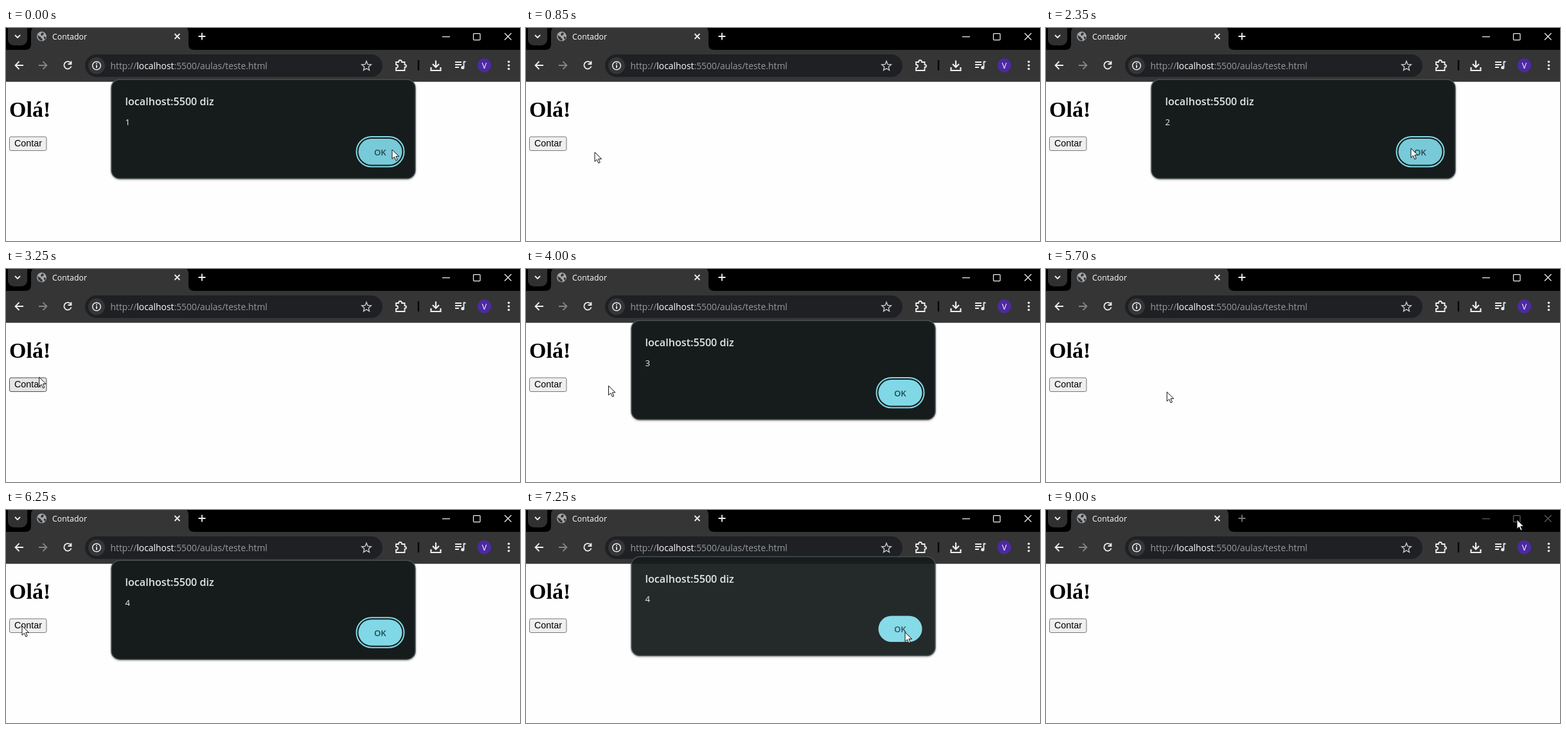
Animation of 800x331 px, one loop 9.05 s. Source, as an HTML page:

```html
<!DOCTYPE html>
<html lang="pt">
<head>
<meta charset="utf-8">
<title>Contador</title>
<style>
  html, body { margin: 0; height: 100%; overflow: hidden; background: #fff; }
  svg { display: block; width: 100%; height: 100%; }
  text { font-family: "Open Sans", "Noto Sans", sans-serif; }
  .line { fill: none; stroke: #eee; stroke-width: 1.8; }
  .thin { stroke-width: 1.25; }
</style>
</head>
<body>
<svg viewBox="0 0 800 331">
  <defs>
    <filter id="shadow" x="-10%" y="-10%" width="120%" height="125%">
      <feDropShadow dx="0" dy="1" stdDeviation="1.5" flood-opacity=".4"/>
    </filter>
  </defs>
  <rect width="800" height="331" fill="#fefefe"/>

  <!-- Title bar and tab -->
  <rect width="800" height="35" fill="#000"/>
  <rect x="3" y="-8" width="30" height="35" rx="9" fill="#303030"/>
  <path class="line" d="M14 11l4 4 4-4"/>
  <path d="M30 34q9 0 9-9V7q0-7 7-9H277q7 2 7 9V25q0 9 9 9z" fill="#353535"/>
  <circle cx="55.5" cy="13" r="7.5" fill="#a4a8ac"/>
  <path d="M49 11l5 3 1 2 2 1-1 3q-6-1-7-9zM56 7l3 1-1 3-3 1-1-2zM59 13l3 1-1 4-2-2z" fill="#353535"/>
  <text x="72" y="18" font-size="12.3" fill="#fff">Contador</text>
  <path class="line" d="M262.500 9l8 8m0-8l-8 8"/>
  <path class="line" id="plus" d="M299.500 13h11m-5.500-5.500v11"/>
  <g class="line thin" id="controls">
    <path d="M679 13.500h12M776 8l10.500 10.500m0-10.500l-10.500 10.500"/>
    <rect x="727.500" y="8.500" width="10.500" height="10" rx="1"/>
  </g>

  <!-- Toolbar -->
  <rect y="34" width="800" height="49.600" fill="#353535"/>
  <path class="line" d="M27 58H14.500m6-6l-6 6 6 6"/>
  <path class="line" d="M51 58h12.500m-6-6l6 6-6 6" style="stroke:#858585"/>
  <path class="line" d="M101 55a5.700 5.700 0 1 0 .5 4.500M101.500 51.500v4.500h-5"/>
  <rect x="123" y="41" width="463" height="35" rx="17.500" fill="#1f2023"/>
  <circle cx="141" cy="58.500" r="13" fill="#353638"/>
  <circle class="line" cx="141" cy="58.500" r="6.300" style="stroke-width:1.5"/>
  <path class="line" d="M141 57.500v4.500m0-7.500v1.700"/>
  <text x="162.500" y="64" font-size="13.9" fill="#989a9d">http://<tspan fill="#fff">localhost</tspan>:5500/aulas/teste.html</text>
  <path class="line" d="M561 51.500l2 5 5.300.4-4 3.500 1.200 5.200-4.500-2.800-4.500 2.800 1.200-5.200-4-3.500 5.300-.4z" style="stroke:#c6c8ca;stroke-width:1.4"/>
  <path class="line" d="M607 53h4q0-3 2.500-3t2.500 3h4.500v4q2.500 0 2.500 2t-2.500 2v5h-13.500v-4q3 0 3-2.500t-3-2.500z"/>
  <path d="M642 50v16" stroke="#080808" stroke-width="2.500"/>
  <path class="line" d="M669 50.500v10m-5-4.500l5 5 5-5M661.500 61v5h15v-5" style="stroke-width:2.200"/>
  <path class="line" d="M699 53h10m-10 4h10m-10 4h6M712.500 61v-8.500h3"/>
  <circle cx="710.800" cy="61.500" r="2.600" fill="#e8e8e8"/>
  <circle cx="744.500" cy="58" r="10.700" fill="#4c2aa0"/>
  <text x="744.500" y="62.500" font-size="12.500" text-anchor="middle" fill="#fff">V</text>
  <g fill="#e8e8e8">
    <circle cx="782.500" cy="52.500" r="1.800"/><circle cx="782.500" cy="58" r="1.800"/><circle cx="782.500" cy="63.500" r="1.800"/>
  </g>

  <!-- Page -->
  <text x="5" y="138" font-size="34" font-weight="700" style="font-family:'Liberation Serif',serif">Olá!</text>
  <rect id="button" x="5.500" y="169" width="57.500" height="21.500" rx="2.500" stroke="#767676"/>
  <text x="13" y="184" font-size="14.300" style="font-family:'Liberation Sans',sans-serif">Contar</text>

  <g id="dialog">
    <rect x="164" y="80" width="473" height="154" rx="13" fill="#161b1d" stroke="#4c5153" stroke-width="1.500" filter="url(#shadow)"/>
    <text x="185.500" y="120" font-size="16.150" font-weight="600" fill="#e2e5e6">localhost:5500 diz</text>
    <text id="count" x="185.500" y="150.500" font-size="13.300" fill="#f0f2f2"></text>
    <rect id="ring" x="545.500" y="169" width="74" height="46.500" rx="23.250" fill="none" stroke="#80d8e6" stroke-width="2"/>
    <rect id="ok" x="548.500" y="172" width="68" height="40.500" rx="20.250"/>
    <text x="582.300" y="197.500" font-size="13.200" font-weight="600" text-anchor="middle" fill="#24474e">OK</text>
  </g>

  <path id="cursor" d="M0 0V14.500l3.400-3.200 2.500 5.600 2.300-1-2.400-5.500h4.700z" fill="#fff" stroke="#111" stroke-width="1" stroke-linejoin="round"/>
</svg>
<script>
const LOOP = 9050, STEP = 50, FADE = 200, SLIDE = 30;
const $ = id => document.getElementById(id);
const set = (id, name, value) => $(id).setAttribute(name, value);

// start, end, from x, y, to x, y, vertical bow
const moves = [
  [250, 1015, 601, 189, 40, 184, 13.5],
  [1450, 2250, 40, 184, 568, 187, 8],
  [2600, 3300, 568, 187, 44, 171, -14],
  [3750, 4750, 44, 171, 585, 193, 10],
  [5250, 5950, 585, 193, 25, 180, 8],
  [6300, 7000, 25, 180, 590, 190, 8],
  [7300, 8350, 590, 190, 733, 15, 0]
];
// opening and closing time of each alert
const alerts = [[-FADE, 200], [1350, 2450], [3500, 5120], [6100, 7150]];

function cursorAt(t) {
  const [start, end, x0, y0, x1, y1, bow] = moves.findLast(m => t >= m[0]) || moves[0];
  const u = Math.max(0, Math.min(1, (t - start) / (end - start)));
  const e = u * u * (3 - 2 * u);
  return [x0 + (x1 - x0) * e, y0 + (y1 - y0) * e + bow * Math.sin(Math.PI * u)];
}

const inside = (x, y, l, t, r, b) => x >= l && x <= r && y >= t && y <= b;

function draw(now) {
  const t = Math.floor((now % LOOP) / STEP) * STEP;
  const [x, y] = cursorAt(t);
  set("cursor", "transform", `translate(${x} ${y})`);

  const index = alerts.findIndex(([open, close]) => t >= open && t < close + FADE);
  const shown = index >= 0;
  $("dialog").style.display = shown ? "" : "none";
  if (shown) {
    const [open, close] = alerts[index];
    const closing = t >= close;
    const away = closing ? (t - close) / FADE : Math.max(0, 1 - (t - open) / FADE);
    const hover = !closing && inside(x, y, 548, 172, 617, 213);
    set("dialog", "transform", `translate(0 ${-SLIDE * away ** 2})`);
    set("dialog", "opacity", 1 - away ** 4);
    set("ok", "fill", hover ? "#78cad8" : "#80d8e6");
    $("ring").style.display = closing ? "none" : "";
    $("count").textContent = index + 1;
  }

  const over = !shown && inside(x, y, 5, 167, 63, 191);
  set("button", "fill", over ? "#e5e5e5" : "#efefef");
  set("button", "stroke", over ? "#4f4f4f" : "#767676");

  const inactive = t >= 8800;
  $("plus").style.stroke = inactive ? "#777" : "";
  $("controls").style.stroke = inactive ? "#5c5c5c" : "";
}

function tick() {
  draw(performance.now());
  requestAnimationFrame(tick);
}
tick();
</script>
</body>
</html>
```
